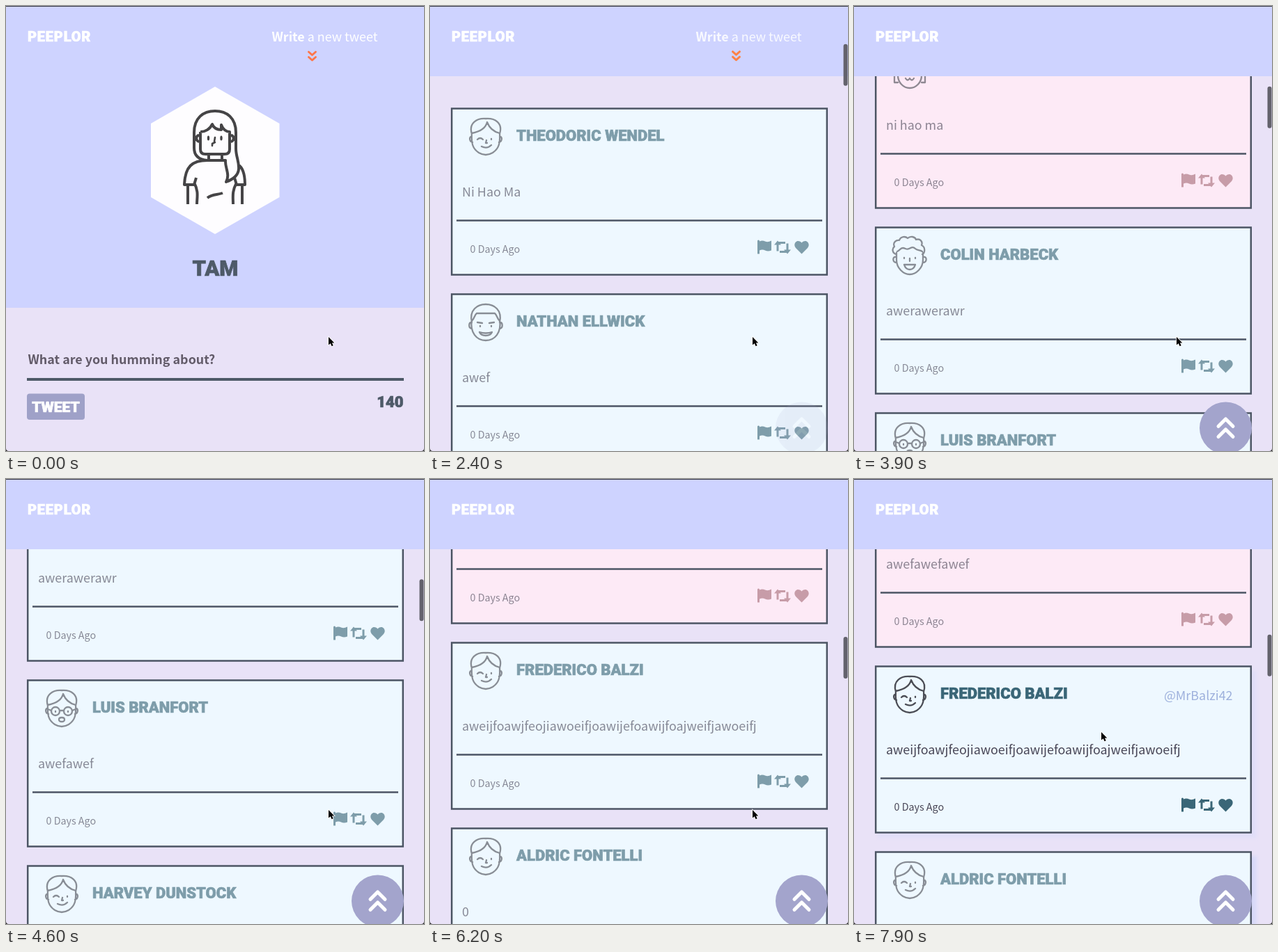
Recreate the animation shown at these times as an HTML page. Size 600 by 640 pixels, loop 8000 ms.

```html
<!DOCTYPE html>
<html lang="en">
<head>
<meta charset="utf-8">
<title>Scrolling feed</title>
<style>
  html, body { margin: 0; width: 100%; height: 100%; overflow: hidden; background: #e9e2f7; }
  svg { display: block; width: 600px; height: 640px; }
  text { font: 300 17.9px "Noto Sans CJK JP", "Noto Sans CJK SC", "Noto Sans CJK", "Open Sans", sans-serif; white-space: pre; }
  .bold { font-weight: 700; }
  .block { font: 900 22px Roboto, Inter, sans-serif; stroke: currentColor; stroke-width: .7; fill: currentColor; }
  .small { font-size: 14.3px; }
  .line { fill: none; stroke-linecap: round; stroke-linejoin: round; }
  .ink { fill: #484656; }
</style>
</head>
<body>
<svg id="stage" viewBox="0 0 600 640"></svg>
<script>
const LOOP = 8000, DARK = '#4c5564', FIRST = 679.5, PITCH = 267;
const THEMES = {
  blue: { bg: '#eef8ff', accent: '#3a6677' },
  pink: { bg: '#fdeaf6', accent: '#a76e79' }
};

// Face parts are drawn around 0,0.
const HEAD = 'M-20-5C-21 9-19 17-10 23Q0 29 10 23C19 17 21 9 20-5M-20 0c-4-1-4 7 1 8M20 0c4-1 4 7-1 8';
const HAIR = 'M-20-4C-25-20-12-27 0-26C13-27 25-20 20-4M-20-5C-10-7 0-12 2-21C5-13 12-7 20-5';
const WINK = 'M-12 4q4-4 8 0M8 3v1M1 5l-1 4h2M-6 14Q2 18 8 12';
const FACES = {
  wink: HEAD + HAIR + WINK,
  glasses: HEAD + HAIR + 'M-15 4a6 6 0 1 0 12 0a6 6 0 1 0-12 0M3 4a6 6 0 1 0 12 0a6 6 0 1 0-12 0M-3 3h6M-15 3l-5-2M15 3l5-2M-9 4v1M9 4v1M-4 16q0-3 4-3t4 3t-4 3t-4-3',
  bob: 'M-22 18V-6C-22-20-12-26 0-26S22-20 22-6V18h-5M-22 18h5M-17-6V8C-17 18-9 26 0 26S17 18 17 8V-6ZM-8-25L-10-6M8-25L10-6M-11 5q3-4 6 0M5 5q3-4 6 0M-6 12q3 5 6 0q3 5 6 0',
  curly: 'M-19-2c-6-1-7-8-3-11c-3-6 3-10 7-9c2-6 9-6 12-3c4-4 11-2 12 2c6-2 10 3 8 8c6 3 5 11 1 13M-18-6c4-1 4-5 8-5s5 3 9 1s6-3 9 0s6 1 10 4M-19-4V6C-19 18-9 27 0 27S19 18 19 6V-4M-20 2c-5-1-5 8 1 8M20 2c5-1 5 8-1 8M-8 3v1M8 3v1M0 4v4M-8 13h16q-2 7-8 7t-8-7',
  pigtails: 'M-18-5C-18 14-11 25 0 25S18 14 18-5M-19-2C-22-18-12-26 0-26S22-18 19-2M-18-5C-9-7-2-13 0-23C3-13 10-7 18-5M-18 4c-7 1-9 12-8 22c6-1 8-6 7-14M18 4c7 1 9 12 8 22c-6-1-8-6-7-14M-11 3q3-4 6 0M5 3q3-4 6 0M-10 10h20q1 9-6 9h-8q-7 0-6-9M-10 14h20M-5 10v9M0 10v9M5 10v9',
  short: 'M-20-4C-23 15-13 26 0 26S23 15 20-4M-20 0C-24-18-12-26 0-26S24-18 20 0M-20-2C-16-6-16-11-13-13H13C16-11 16-6 20-2M-20 0c-5 0-5 8 0 9M20 0c5 0 5 8 0 9M-12 0l7 1M12 0l-7 1M-8 5v1M8 5v1M-9 14q9 3 18 0q-2 5-9 5t-9-5'
};

const CARDS = [
  ['THEODORIC WENDEL', 'Ni Hao Ma', 'wink'],
  ['NATHAN ELLWICK', 'awef', 'short'],
  ['ROSALINDA FENWORT', 'ni hao ma', 'bob', 'pink'],
  ['COLIN HARBECK', 'awerawerawr', 'curly'],
  ['LUIS BRANFORT', 'awefawef', 'glasses'],
  ['HARVEY DUNSTOCK', 'awefawefawefawef', 'wink'],
  ['MARISA QUEDO', 'awefawefawef', 'pigtails', 'pink'],
  ['FREDERICO BALZI', 'aweijfoawjfeojiawoeifjoawijefoawijfoajweifjawoeifj', 'wink', 'blue', '@MrBalzi42'],
  ['ALDRIC FONTELLI', '0', 'wink'],
  ['RAIMOND BARTOLENZI', 'awerawer', 'short']
];

const line = (d, color, width, more = '') =>
  `<path class="line" d="${d}" stroke="${color}" stroke-width="${width}" ${more}/>`;
const block = (x, y, str, color, more = '') =>
  `<text class="block" x="${x}" y="${y}" color="${color}" ${more}>${str}</text>`;

const icons = color => `
  <path fill="${color}" d="M470 190q1.500-2 3 0v1q4-2 8 0t9-1v14q-5 2-9 0t-8 0v5h-3z"/>
  ${line('M499 205V193H510M513 194V206H502', color, 3, 'style="stroke-linecap:butt"')}
  <path fill="${color}" d="M494 196l5-6l5 6zM508 203h10l-5 6z"/>
  <path fill="${color}" d="M533.500 209l-8.500-8.500c-5-6 2-14 8.500-7.500c6.500-6.500 13.500 1.500 8.500 7.500z"/>`;

function card([name, words, face, theme = 'blue', handle], i) {
  const { bg, accent } = THEMES[theme];
  return `<g transform="translate(0 ${FIRST + i * PITCH})">
    <rect id="shadow${i}" x="34" y="6" width="544" height="241" fill="#c3d0fb" filter="url(#soft)" opacity="0"/>
    <rect x="31.200" width="538.600" height="239" fill="${bg}" stroke="${DARK}" stroke-width="2.500"/>
    <path d="M38 161H563" stroke="${DARK}" stroke-width="2.500"/>
    <g id="body${i}">
      ${line(FACES[face], '#4b4d55', 2.3, 'transform="translate(80 40.500)"')}
      ${block(124, 46.5, name, accent)}
      <text class="ink" x="46" y="126">${words}</text>
      <text class="ink small" x="57.500" y="207.500">0 Days Ago</text>
      ${icons(accent)}
    </g>
    ${handle ? `<text id="handle" x="543.500" y="48" text-anchor="end" fill="#9db0dc">${handle}</text>` : ''}
  </g>`;
}

const portrait = [
  'M289 222C276 221 270 215 270 204V182C270 161 283 151 300 151S330 161 330 182V205C330 217 335 224 334 235C333 245 324 250 316 253C322 242 314 232 315 222H289',
  'M279 181V206Q279 213 286 213H314Q321 213 321 206V181C316 181 311 177 309 171V178C303 178 298 175 296 170C293 177 286 181 279 181',
  'M277 186c-5 0-5 9 1 9M323 186c5 0 5 9-1 9M291 213v9M310 213v9',
  'M289 222C267 222 257 231 256 257H270L273 247M270 254C277 267 274 275 274 285M261 258V285',
  'M333 228C341 233 343 245 343 257H331L328 247M331 254C324 267 326 275 326 285M339 258V285',
  'M289 276C297 270 303 272 311 269'
].join('');

document.getElementById('stage').innerHTML = `
  <defs><filter id="soft"><feGaussianBlur stdDeviation="2"/></filter></defs>
  <rect width="600" height="640" fill="#e9e2f7"/>
  <g id="page">
    <rect width="600" height="434" fill="#ced3ff"/>
    <path d="M300 116L392.500 169V275L300 328L208 275V169Z" fill="#fefdff"/>
    ${line(portrait, '#454446', 4, 'style="stroke-linecap:butt"')}
    ${line('M300 189l-1 6M296 201v-3l4-2', '#454446', 2.6)}
    <ellipse cx="290.500" cy="190" rx="1.700" ry="3.500" fill="#454446"/>
    <ellipse cx="309" cy="190" rx="1.700" ry="3.500" fill="#454446"/>
    ${block(300.5, 388, 'TAM', '#4e5a68', 'text-anchor="middle" style="font-size:31px"')}
    <text class="bold" x="31.500" y="515" fill="#625b69">What are you humming about?</text>
    <path d="M30 537H571" stroke="#4e5a68" stroke-width="4"/>
    <rect x="30" y="557.500" width="83" height="37.500" rx="4" fill="#9fa1c8"/>
    ${block(71.5, 584, 'TWEET', '#fff', 'text-anchor="middle" style="font-size:21px"')}
    ${block(570.5, 577, '140', '#4e5a68', 'text-anchor="end"')}
    ${CARDS.map(card).join('')}
  </g>
  <rect width="600" height="101" fill="#ced3ff"/>
  ${block(31, 50.5, 'PEEPLOR', '#fff', 'style="font-size:20px;letter-spacing:.04em"')}
  <text id="write" x="381.500" y="51" fill="#fff"><tspan class="bold">Write</tspan> a new tweet</text>
  ${line('M434.500 66l5 4.500l5-4.500m-10 7.500l5 4.500l5-4.500', '#ff7a4a', 3, 'id="arrow"')}
  <g id="up">
    <circle cx="533.500" cy="607" r="37.500" fill="#a3a4cc"/>
    ${line('M523 604.500l10.500-10.500l10.500 10.500M523 619.500l10.500-10.500l10.500 10.500', '#fff', 5)}
  </g>
  <rect id="thumb" x="593.500" width="6" height="60" rx="3" fill="#63626c"/>
  <path id="cursor" d="M0 0V11.500L2.700 9.200L4.600 13.300L6.700 12.300L4.900 8.400H8.300Z" stroke="#fff" stroke-width="1.400" paint-order="stroke"/>
  <path d="M0 .5H600" stroke="#3a3a46"/>
  <path d="M0 636Q0 640 4 640H0ZM600 636Q600 640 596 640H600Z" fill="#222"/>`;

// Scroll position over time: [ms, px]
const KEYS = [[0, 0], [500, 0], [1500, 226], [1900, 325], [3300, 925], [4600, 1458],
  [5600, 2036], [6900, 2601], [7050, 2615], [7500, 2360], [7900, 2279], [8000, 2279]];

const secant = i => (KEYS[i + 1][1] - KEYS[i][1]) / (KEYS[i + 1][0] - KEYS[i][0]);
function slope(i) {
  if (i === 0 || i === KEYS.length - 1 || secant(i - 1) * secant(i) <= 0) return 0;
  return (KEYS[i + 1][1] - KEYS[i - 1][1]) / (KEYS[i + 1][0] - KEYS[i - 1][0]);
}
function scrollAt(t) {
  const i = KEYS.findIndex((k, n) => n < KEYS.length - 1 && t < KEYS[n + 1][0]);
  const [t0, a] = KEYS[i], [t1, b] = KEYS[i + 1];
  const d = t1 - t0, u = (t - t0) / d, v = 1 - u;
  return Math.round(a * v * v * (1 + 2 * u) + b * u * u * (3 - 2 * u)
    + d * u * v * (v * slope(i) - u * slope(i + 1)));
}

function ramp(t, from, to) {
  const u = (t - from) / (to - from);
  return u < 0 ? 0 : u > 1 ? 1 : u;
}
const mix = (a, b, u) => a + (b - a) * u;
const set = (id, attr, value) => document.getElementById(id).setAttribute(attr, value);
const move = (id, x, y) => set(id, 'transform', `translate(${x} ${y})`);

function draw(t) {
  const scroll = scrollAt(t);
  move('page', 0, -scroll);
  set('thumb', 'y', 3.2 + scroll * .0968);
  set('thumb', 'opacity', ramp(t, 500, 700));

  const gone = ramp(t, 2350, 2750), glow = (1 - Math.cos(t / 1500 * Math.PI)) / 2;
  set('write', 'opacity', 1 - gone);
  set('up', 'opacity', gone);
  set('arrow', 'opacity', 1 - ramp(t, 2450, 2850));
  set('arrow', 'stroke', `rgb(255 ${mix(118, 152, glow)} ${mix(74, 62, glow)})`);
  move('arrow', 0, -glow);

  const near = t >= 7200 && t < 7600, on = t >= 7600;
  CARDS.forEach((_, i) => set('body' + i, 'opacity', i === 7 && on || i === 8 && near ? 1 : .62));
  set('handle', 'opacity', on ? 1 : 0);
  set('shadow7', 'opacity', ramp(t, 7800, 8300));
  set('shadow8', 'opacity', ramp(t, 7200, 7500) * (1 - ramp(t, 7650, 8100)));

  const u = ramp(t, 7500, 7900), ease = u * u * (3 - 2 * u);
  move('cursor', mix(463, 355, ease), mix(476, 364, ease));
}

function frame() {
  draw(Math.floor(performance.now() % LOOP / 100) * 100);
  requestAnimationFrame(frame);
}
frame();
</script>
</body>
</html>
```
